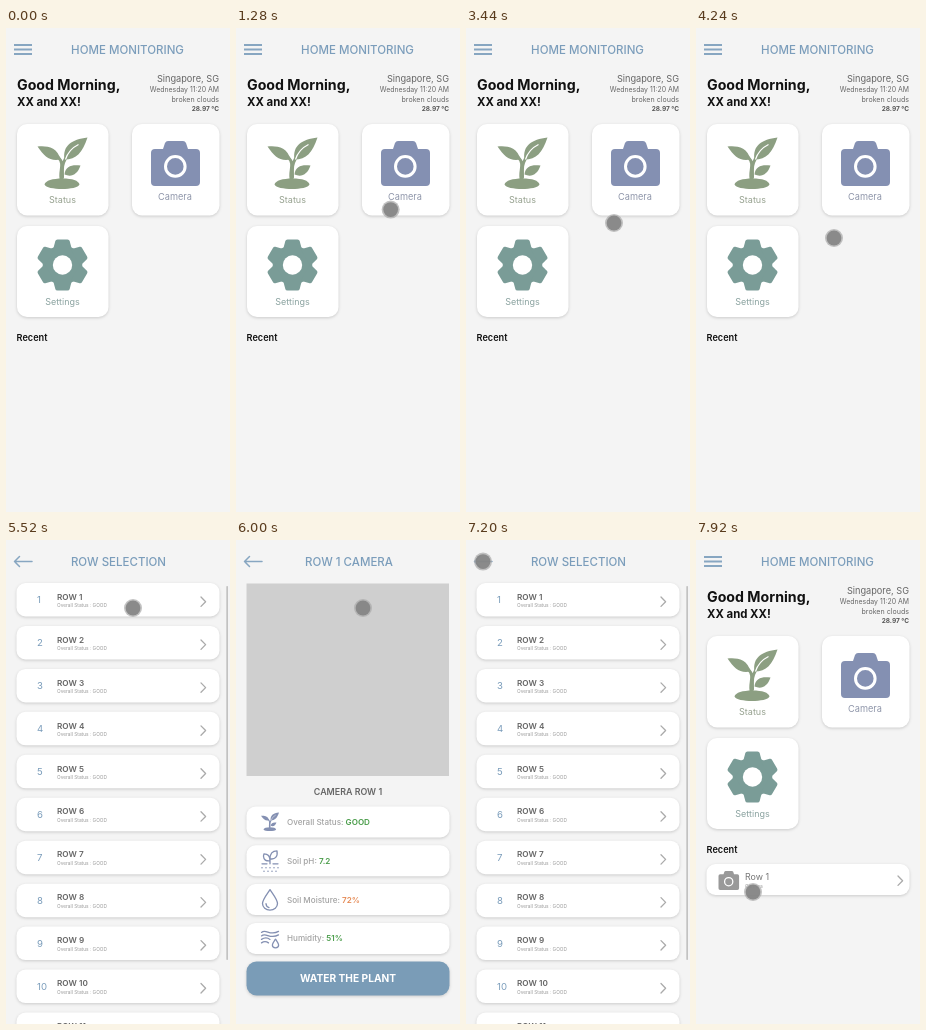
Animation, 224 px wide and 484 px high, one loop 8000 ms. Source, as an HTML page:

```html
<!DOCTYPE html>
<html lang="en">
<head>
<meta charset="utf-8">
<title>Home monitoring</title>
<style>
html, body { margin: 0; width: 100%; height: 100%; overflow: hidden; background: #f4f4f4; }
svg { display: block; width: 100%; height: 100%; }
text { font-family: Inter, "Open Sans", sans-serif; }
.card { fill: #fff; filter: drop-shadow(.7px 1px 1.8px rgba(0, 0, 0, .17)); }
.line { fill: none; stroke: currentColor; stroke-linecap: round; stroke-linejoin: round; }
.bar { color: #87a6c1; }
</style>
</head>
<body>
<svg id="stage" viewBox="0 0 224 484">
  <defs>
    <g id="camera">
      <path fill="currentColor" d="M4 8H12L14 2Q15 0 17 0H32Q34 0 35 2L37 8H45Q49 8 49 12V41Q49 45 45 45H4Q0 45 0 41V12Q0 8 4 8Z"/>
      <circle cx="24.3" cy="25.4" r="9.8" fill="none" stroke="#fff" stroke-width="3"/>
    </g>
    <g id="plant">
      <path fill="currentColor" d="M0 9C8 8 20 9 23 22C12 24 7 19 0 9ZM50 0C34 2 25 8 27 22C39 22 45 15 50 0ZM27 37C28 28 35 27 43 28C40 37 34 40 27 37Z"/>
      <path class="line" stroke-width="3" d="M21 20C28 27 21 34 24 43M28 21C24 28 25 32 25 40"/>
      <path d="M41 7Q31 12 28 22" fill="none" stroke="#fff" stroke-width="1.2"/>
      <path fill="currentColor" d="M7 47C8 43 15 41 25 41S41 43 42 47C40 53 9 53 7 47Z"/>
    </g>
    <path id="arrow" class="line bar" stroke-width="1.5" d="M26 21.5H8.5M13.5 16.5L8.5 21.5L13.5 26.5"/>
    <path id="chevron" class="line" color="#aaa" stroke-width="1.3" d="M0 0L4.6 4.7L0 9.4"/>
  </defs>
  <g id="home"></g>
  <g id="rows"></g>
  <g id="detail"></g>
  <g id="cursor">
    <circle r="9" fill="#a8a8a8" opacity=".7"/>
    <circle r="7.4" fill="#808080" opacity=".85"/>
  </g>
</svg>
<script>
const LOOP = 8000;
const $ = id => document.getElementById(id);
const BLUE = '#7b9dbb', INDIGO = '#8490b2', SAGE = '#8c9f82', TEAL = '#7a9c97';

const text = (x, y, size, fill, str, weight = 400, anchor = 'start') =>
  `<text x="${x}" y="${y}" font-size="${size}" fill="${fill}" font-weight="${weight}" text-anchor="${anchor}">${str}</text>`;
const card = (x, y, w, h, r = 9) =>
  `<rect class="card" x="${x}" y="${y}" width="${w}" height="${h}" rx="${r}"/>`;
const use = (id, x, y, scale = 1, color = '#aaa') =>
  `<use href="#${id}" color="${color}" transform="translate(${x} ${y}) scale(${scale})"/>`;
const title = (x, str) => text(x, 26, 11.5, BLUE, str, 450, 'middle');
const page = body => `<rect width="224" height="484" fill="#f4f4f4"/>${body}`;

function gear(x, y) {
  let teeth = '';
  for (let a = 0; a < 360; a += 60)
    teeth += `<path transform="rotate(${a})" d="M-9.5 -15L-7.2 -24Q-6.8 -25.5 -5 -25.5H5Q6.8 -25.5 7.2 -24L9.5 -15Z"/>`;
  return `<g transform="translate(${x} ${y})" fill="${TEAL}"><circle r="19.8"/>${teeth}<circle r="9.7" fill="#fff"/></g>`;
}

function homePage() {
  const bars = [17, 21.5, 26].map(y => `M8 ${y}H26`).join('');
  return page(
    `<path class="bar" stroke="currentColor" stroke-width="1.9" d="${bars}"/>` +
    title(121.5, 'HOME MONITORING') +
    text(11, 62, 14.2, '#111', 'Good Morning,', 700) +
    text(11, 78, 11.4, '#111', 'XX and XX!', 700) +
    text(213, 53.5, 9.2, '#666', 'Singapore, SG', 400, 'end') +
    text(213, 64, 6.9, '#666', 'Wednesday 11:20 AM', 400, 'end') +
    text(213, 73.5, 7.1, '#666', 'broken clouds', 400, 'end') +
    text(213, 83, 6.5, '#555', '28.97 °C', 700, 'end') +
    card(11, 96, 91.5, 91.5, 10) + use('plant', 31.5, 109.5, 1, SAGE) +
    text(56.5, 174.8, 9, '#96a18f', 'Status', 400, 'middle') +
    card(126, 96, 87.5, 91.5, 10) + use('camera', 145, 113, 1, INDIGO) +
    text(169, 172, 9.2, '#8f96aa', 'Camera', 400, 'middle') +
    card(11, 198, 91.5, 91, 10) + gear(56.5, 237) +
    text(56.5, 276.8, 9, '#8ba3a0', 'Settings', 400, 'middle') +
    text(10.5, 312.6, 9.2, '#111', 'Recent', 600) +
    `<g id="recent">${card(10.5, 324, 203, 31)}${use('camera', 22.5, 331, .42, '#999')}` +
    text(49, 340, 8.9, '#777', 'Row 1') + text(49, 348, 4.8, '#999', 'Camera') +
    use('chevron', 202, 336) + '</g>');
}

function rowsPage() {
  let list = '';
  for (let i = 0; i < 11; i++) {
    const y = 43 + i * 42.95;
    list += card(10.5, y, 203, 33.5) +
      text(31, y + 20.4, 9.6, BLUE, i + 1) +
      text(51, y + 16.7, 8.2, '#666', 'ROW ' + (i + 1), 600) +
      text(51, y + 24.2, 4.8, '#999', 'Overall Status : GOOD') +
      use('chevron', 195, y + 14);
  }
  return page('<use href="#arrow"/>' + title(112.5, 'ROW SELECTION') + list +
    '<rect x="220.3" y="46" width="1.7" height="374" rx=".8" fill="#c2c2c2"/>');
}

function detailPage() {
  const green = '#4b9d4b';
  const drop = 'M0 -10C4 -4 7.5 0 7.5 4A7.5 6.5 0 0 1 -7.5 4C-7.5 0 -4 -4 0 -10Z';
  const wave = y => `M-8.5 ${y}C-4 ${y - 4} 0 ${y + 4} 8.5 ${y - 1}`;
  const outline = d => `<path class="line" stroke-width="1.3" d="${d}"/>`;
  const icons = [
    use('plant', -9, -9.5, .36, INDIGO),
    outline('M-8 3H-3M3 3H8M0 3V-4M0 0C-7 1 -7 -5 -6 -7C-2 -7 0 -5 0 0M0 -2C0 -8 3 -10 7 -10C8 -4 5 -1 0 -2') +
      '<path class="line" stroke-width="1.5" stroke-dasharray="0 4" d="M-8 7H9M-6 10.5H7"/>',
    outline(drop) + outline('M-4 4Q-4 7 -1 8'),
    outline(wave(-6) + wave(-2.5) + 'M-8.5 1Q-4 -2 0 1M-8.5 4.5Q-5 2 -1.5 4.5') +
      `<g transform="translate(5.5 5) scale(.42)"><path class="line" stroke-width="3" d="${drop}"/></g>`
  ];
  const stats = [
    ['Overall Status:', 'GOOD', green], ['Soil pH:', '7.2', green],
    ['Soil Moisture:', '72%', '#e58a55'], ['Humidity:', '51%', green]
  ];
  const list = stats.map(([label, value, color], i) => {
    const y = 266.5 + i * 38.8;
    return card(10.5, y, 203, 31) +
      `<g color="${INDIGO}" transform="translate(34 ${y + 15.5})">${icons[i]}</g>` +
      text(51, y + 18.4, 8.1, '#a2a2a2', `${label} <tspan fill="${color}" font-weight="600">${value}</tspan>`, 500);
  }).join('');
  return page('<use href="#arrow"/>' + title(113, 'ROW 1 CAMERA') +
    '<rect x="10.5" y="43.5" width="202.5" height="192.5" fill="#cfcfcf"/>' +
    text(112, 254.8, 8.9, '#666', 'CAMERA ROW 1', 600, 'middle') + list +
    `<rect class="card" x="10.5" y="421.5" width="203" height="34" rx="10" style="fill:#7a9cb7"/>` +
    text(112, 442.3, 10.2, '#fff', 'WATER THE PLANT', 700, 'middle'));
}

$('home').innerHTML = homePage();
$('rows').innerHTML = rowsPage();
$('detail').innerHTML = detailPage();

// Pointer stops: time, x, y
const path = [
  [1040, 236, 190], [1360, 140, 180], [1640, 12, 220], [1840, 60, 245],
  [2160, 88, 258], [2640, 90, 252], [3160, 168, 185], [3440, 148, 195],
  [3840, 134, 212], [4240, 138, 210], [4400, 142, 173], [5120, 142, 173],
  [5500, 127, 68], [6080, 127, 68], [6660, 17, 25], [7080, 17, 25],
  [7240, 17, 21], [7480, 17, 21], [7900, 57, 352], [8000, 57, 352]
];
const clamp = v => Math.min(1, Math.max(0, v));
const smooth = v => v * v * (3 - 2 * v);
const fade = (t, start, dur) => smooth(clamp((t - start) / dur));

function pointer(t) {
  const i = path.findIndex(p => p[0] > t);
  if (i < 1) return null;
  const [t0, x0, y0] = path[i - 1], [t1, x1, y1] = path[i];
  const k = smooth((t - t0) / (t1 - t0));
  return [x0 + (x1 - x0) * k, y0 + (y1 - y0) * k];
}

function show(id, opacity) {
  $(id).style.opacity = opacity;
  $(id).style.display = opacity > 0 ? '' : 'none';
}

function render(t) {
  show('rows', fade(t, 4720, 320) - fade(t, 7240, 280));
  show('detail', fade(t, 5700, 300) - fade(t, 6800, 280));
  show('recent', t > 6000 ? 1 : 0);
  const p = pointer(t);
  show('cursor', p ? 1 : 0);
  if (p) $('cursor').setAttribute('transform', `translate(${p[0]} ${p[1]})`);
}

const start = performance.now();
function tick() {
  render((performance.now() - start) % LOOP);
  requestAnimationFrame(tick);
}
tick();
</script>
</body>
</html>
```
